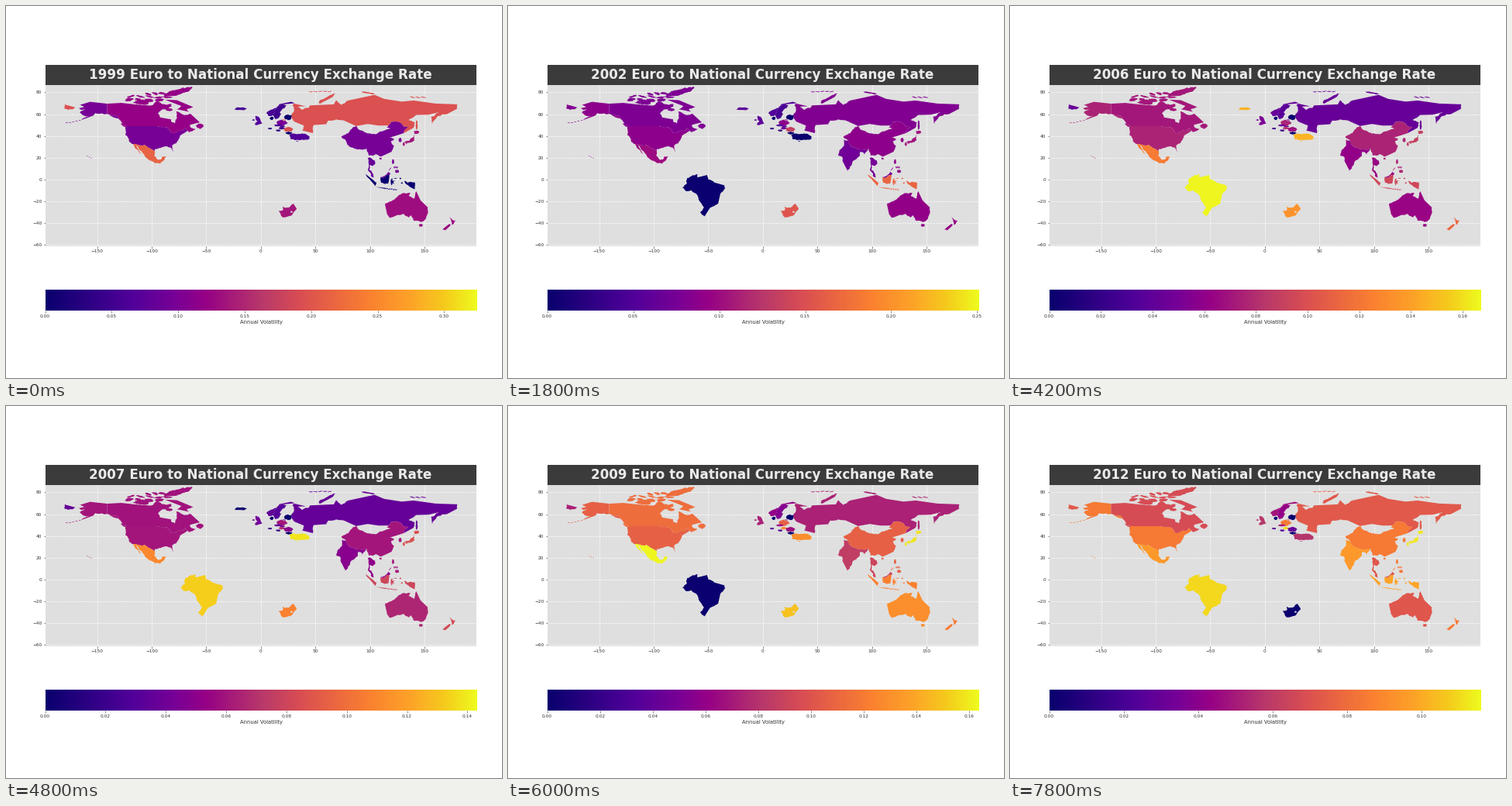
Animation, 640 px wide and 480 px high, one loop 8 s. Source, as a matplotlib script:

```python
import numpy as np
import matplotlib.pyplot as plt
from matplotlib.animation import FuncAnimation
from matplotlib.colors import LinearSegmentedColormap
from matplotlib.patches import Polygon

W, H, DPI = 640, 480, 100
FIRST_YEAR, HOLD, FRAMES = 1999, 3, 40
LAND_BG, INK = "#dfdfdf", "#333333"

rng = np.random.default_rng(4)
plt.rcParams["font.family"] = "DejaVu Sans"
cmap = LinearSegmentedColormap.from_list("heat", [
    (0, "#0a006e"), (.2, "#52009a"), (.3, "#780096"), (.37, "#960086"),
    (.5, "#b8386a"), (.6, "#db5050"), (.75, "#fa8030"), (.85, "#fda428"),
    (.93, "#f5cc1c"), (1, "#eefa1e")])

# Per year: top of the colour scale, and the dollar's share of it
TOPS = [.3242, .1643, .648, .2507, .2005, .1637, .1665,
        .1669, .143, .643, .1634, .1419, .15, .1157]
DOLLAR = [.3, .83, .2, .35, .52, .57, .54, .45, .42, .21, .65, .76, .68, .73]

# Volatility as a multiple of the dollar's: constant, or key points by year
TRENDS = {
    "Canada": {1999: 1.23, 2001: .9, 2005: .9, 2010: 1.1, 2012: .8},
    "Mexico": {1999: 2.2, 2001: 1.1, 2004: 1.2, 2008: 2.05, 2010: 1, 2012: 1.12},
    "Brazil": {2001: 1.8, 2002: 2.9, 2004: 1.3, 2006: 2.2, 2008: 2.24, 2010: 1.1, 2012: 1.3},
    "Russia": {1999: 2, 2001: .9, 2004: .96, 2006: .57, 2008: .63, 2012: .86},
    "Japan": {1999: 1.4, 2005: .95, 2008: 1.65, 2010: 1.33},
    "India": {2010: .8, 2012: 1.12},
    "Indonesia": {1999: 3.4, 2001: 2.3, 2004: 1.1, 2008: 1.4, 2010: .9, 2012: 1.16},
    "Australia": {1999: 1.33, 2004: .83, 2006: .85, 2008: 1.33, 2012: .85},
    "New Zealand": {1999: 1.3, 2004: .9, 2006: 1.5, 2010: 1},
    "South Africa": {1999: 1.4, 2001: 1.75, 2008: 1.8, 2010: 1, 2012: 1.37},
    "Turkey": {1999: .67, 2001: 5, 2004: 1.26, 2007: 2.3, 2010: .67},
    "Iceland": {1999: .6, 2004: .67, 2006: 1.95, 2008: 4.8},
    "Hungary": {1999: .5, 2006: 1.1, 2012: 1.3},
    "Romania": {1999: 2, 2006: .9, 2012: .35},
    "Thailand": .85, "Malaysia": .85, "UK": .68, "Norway": .57, "Sweden": .5,
    "Czechia": .6, "Slovakia": .6, "Switzerland": .3, "Croatia": .3,
    "Denmark": 0, "Bulgaria": 0, "Baltics": 0,
}
SINCE = {"Brazil": 2000, "India": 2000}
UNTIL = {"Iceland": 2008, "Slovakia": 2008}


def share(name, i):
    year = FIRST_YEAR + i
    trend = TRENDS.get(name, 1)
    if isinstance(trend, dict):
        trend = np.interp(year, list(trend), list(trend.values()))
    return min(1, trend * DOLLAR[i])


fig = plt.figure(figsize=(W / DPI, H / DPI), dpi=DPI, facecolor="white")


def panel(x0, y0, x1, y1, color):
    ax = fig.add_axes([x0 / W, 1 - y1 / H, (x1 - x0) / W, (y1 - y0) / H], facecolor=color)
    for spine in ax.spines.values():
        spine.set_visible(False)
    ax.tick_params(labelsize=4.2, length=1.8, width=.4, pad=1.5, color=INK, labelcolor=INK)
    return ax


head = panel(51, 76.4, 607, 102.2, "#3b3b3b")
head.set(xticks=[], yticks=[])
title = head.text(.499, .53, "", ha="center", va="center", transform=head.transAxes,
                  color="#ebebeb", size=12.04, weight="bold")

world = panel(51, 102.4, 607, 309.9, LAND_BG)
world.set(xlim=(-197.4, 197.6), ylim=(-61.1, 86.4),
          xticks=range(-150, 151, 50), yticks=range(-60, 81, 20))
world.grid(color="white", ls="--", lw=.5)
world.set_axisbelow(True)

bar = panel(50.6, 366, 607, 393, "white")
ramp = bar.imshow(np.linspace(0, 1, 256)[None], cmap=cmap, aspect="auto")
bar.set_yticks([])
fig.text(329 / W, 1 - 408 / H, "Annual Volatility", ha="center", va="center",
         size=4.85, color=INK)

shapes = {}


def path(*coords):
    return list(zip(coords[::2], coords[1::2]))


def roughen(pts):
    """Bend short edges; shared borders bend alike since only the midpoint matters."""
    out = []
    for p, q in zip(pts, np.roll(pts, -1, axis=0)):
        out.append(p)
        size = np.hypot(*(q - p))
        if .8 < size < 9:
            mid = (p + q) / 2
            out.append(mid + .1 * size * np.sin(mid[::-1] * 37 + mid * 11))
    return np.array(out)


def land(name, pts):
    pts = np.array(pts, float)
    for _ in range(3):
        pts = roughen(pts)
    patch = world.add_patch(Polygon(pts, closed=True, lw=0, zorder=3))
    shapes.setdefault(name, []).append(patch)


def blob(name, lon, lat, width, height, tilt=0):
    """An uneven ellipse for islands and small countries."""
    a = np.linspace(0, 2 * np.pi, 16, endpoint=False)
    r = rng.uniform(.8, 1.2, a.size) / 2
    x, y = width * r * np.cos(a), height * r * np.sin(a)
    c, s = np.cos(np.radians(tilt)), np.sin(np.radians(tilt))
    land(name, np.column_stack([lon + c * x - s * y, lat + s * x + c * y]))


def chain(name, start, end, count, width, height):
    for lon, lat in np.linspace(start, end, count):
        blob(name, lon, lat + rng.uniform(-.3, .3), width, height, rng.uniform(-20, 20))


# Borders that two countries share
YUKON = path(-130, 55.3, -130, 56.1, -134, 58.8, -137.5, 59, -141, 60.3, -141, 69.6)
NORTH = path(-123, 49, -95.2, 49, -88.4, 48.3, -84.8, 46.8, -82.4, 43, -79, 42.8,
             -74.8, 45, -71, 45.2, -69.2, 47.4, -67.1, 45)
RIO = path(-97.2, 25.9, -99.5, 27.5, -103, 29.2, -106.5, 31.8, -111, 31.3, -114.8, 32.5,
           -117.1, 32.5)
AMUR = path(131, 42.6, 131.5, 45, 135, 48.4, 130.8, 48.8, 125.7, 53, 120, 53, 117, 49.6)
HIMALAYA = path(78, 35.5, 81, 30.2, 88.8, 27.5, 97, 28.3)
BORNEO = path(109.6, 2, 112, 1.4, 115.6, 4.1, 117.8, 4.1)
KJOLEN = path(11.2, 59, 12.3, 61, 12.5, 64, 18.2, 68.5, 20.5, 69)

land("USA", YUKON + path(
    -156.6, 71.3, -166, 68.4, -162, 66.4, -168, 65.6, -161, 64, -166, 61.6, -162, 58.6,
    -157.5, 58.5, -164.8, 54.6, -154, 58.5, -151.5, 61, -146, 60.8, -139.5, 59.7, -135, 57))
chain("USA", (-178, 51.8), (-166, 54), 5, 2.2, .5)
chain("USA", (-159, 21.8), (-155.5, 19.7), 3, .9, .6)
land("USA", NORTH + path(
    -70.5, 42.5, -74, 40.6, -75.8, 36, -81.2, 31.5, -80.3, 25.3, -83, 29.5, -89.5, 30,
    -97.3, 27.8) + RIO + path(-120.6, 34.6, -124.2, 41, -124.3, 48.3))

land("Canada", YUKON + path(
    -128, 70.3, -115, 68.9, -101, 67.8, -95.5, 71.8, -90, 69, -82, 69.3, -82, 67, -87, 64.7,
    -94.5, 60.5, -92.5, 57, -82.3, 55.2, -82, 53, -79, 51.3, -77, 56.5, -77.5, 62.5,
    -69.5, 59, -64.5, 60.3, -56, 52.5, -65, 50.2, -64.5, 48, -60, 46.3, -66, 43.5)
    + NORTH[::-1] + path(-127, 51))
land("Canada", path(-88, 73.3, -77, 72.8, -62, 66.5, -68, 64, -66, 62.2, -77, 64.5, -73, 67.5))
blob("Canada", -56, 49, 6, 4.5)
blob("Canada", -125.8, 49.7, 5.5, 1.4, -35)
blob("Canada", -109, 70.8, 15, 4.4)
blob("Canada", -84, 64.2, 6, 2.6)
blob("Canada", -77, 80.2, 27, 5, 15)
chain("Canada", (-121, 73), (-93, 73), 4, 7.5, 2.8)
chain("Canada", (-119, 76.2), (-85, 75.4), 5, 8, 1.5)
chain("Canada", (-103, 78.3), (-91, 79.3), 3, 6, 2)

land("Mexico", RIO + path(
    -115, 28.5, -109.8, 23.2, -114.4, 31.3, -113, 30.8, -109, 25.6, -105.5, 20.2, -100, 17,
    -92.2, 14.6, -88.5, 18, -87, 21.5, -90.5, 21, -91.5, 18.6, -94.5, 18.2, -97.8, 22))

land("Brazil", path(
    -64, 4, -60, 5, -59.8, 2, -51, 4.2, -50, 0, -44.5, -2.7, -35.3, -5.3, -34.9, -8.5,
    -39, -13, -41, -22, -48.5, -26, -53.4, -33.7, -57.5, -30.2, -54, -25.5, -58, -20,
    -60.5, -13.7, -65.4, -10, -70.6, -10.5, -73.9, -7.3, -69.9, -4, -69.5, 1.2))

land("Russia", path(
    30.9, 69.6, 41, 67.3, 34, 66.6, 38, 64, 44, 66, 45, 68, 67, 69, 69, 72.8, 74, 68.5,
    80, 72.5, 104.3, 77.7, 113, 74, 129, 71.5, 140, 72.5, 160, 69.7, 180, 69, 180, 65,
    170.5, 60, 162, 58, 157, 51.2, 156, 57.5, 163, 61.8, 154, 59.5, 142, 59.2, 135.2, 54.7,
    141, 52.5, 140, 47.5) + AMUR + path(
    108, 49.5, 98, 51, 87.3, 49.1, 76.5, 54, 69, 55.2, 61.5, 54, 60, 50.8, 48.5, 50,
    47.7, 42.6, 38, 45, 39.5, 49.5, 31, 53, 28, 56.5, 28, 60, 30.5, 64, 29, 68.5))
land("Russia", path(-180, 68.9, -169.8, 66.1, -173, 64.3, -180, 65))
blob("Russia", 142.8, 50, 1.8, 8.5)
blob("Russia", 60, 74.2, 18, 2.6, 28)
blob("Russia", 21.3, 54.7, 2.6, .9)
chain("Russia", (46, 80.5), (63, 80.7), 5, 4, .7)
chain("Russia", (95, 80), (102, 78.7), 3, 5, 1.3)
chain("Russia", (139, 75.4), (149, 75.2), 3, 5, .8)

land("China", path(
    73.6, 39.4, 80.2, 42.5, 82.5, 46, 87.3, 49.1, 91, 45.2, 97, 42.7, 105, 41.6, 112, 44.5,
    119.8, 46.7, 115.5, 47.7) + AMUR[::-1] + path(
    121.5, 39.5, 118, 38.5, 122.5, 37, 119.2, 35, 122, 30.8, 119.8, 25.5, 110, 21,
    105.5, 23.2, 99, 22) + HIMALAYA[::-1])
blob("China", 109.8, 19.2, 2.2, 1.6)

land("India", path(74, 36.8) + HIMALAYA + path(
    93, 23, 91.8, 25, 89, 25.5, 88.9, 22, 82.3, 16.6, 80, 12, 77.6, 8.1, 73, 17, 72.5, 21,
    69, 22.3, 70, 26.5, 74.5, 31.5))

land("Japan", path(141, 41.4, 140.9, 36, 135.8, 33.7, 131, 34.2, 136.5, 36, 139.8, 39))
blob("Japan", 142.7, 43.4, 5, 3)
blob("Japan", 131, 32.5, 2, 3.4)
blob("Japan", 133.5, 33.5, 2.6, 1)
blob("Korea", 127.8, 36.3, 2.8, 3.8)

land("Thailand", path(
    98, 19.5, 100.2, 20.3, 104.5, 17.5, 105, 14.3, 102.4, 12.5, 100, 13.4, 99.3, 9.3,
    102, 6.3, 100, 6.3, 98.3, 8.2, 99, 14))
land("Malaysia", path(100.3, 6.5, 102.2, 6.2, 103.6, 1.6, 101, 3))
land("Malaysia", BORNEO + path(119, 5.2, 116.8, 7, 113, 3.2))

land("Indonesia", BORNEO + path(117.5, 0, 116.2, -3.8, 110.2, -2.9))
land("Indonesia", path(95.3, 5.6, 103.7, -1, 106, -3, 105, -5.9, 99, 1))
land("Indonesia", path(105.2, -6.7, 114.4, -7.7, 114.4, -8.7))
land("Indonesia", path(119.8, .8, 125, 1.5, 120.4, .2, 120.3, -1, 123.3, -.9, 121.5, -2,
                       122.5, -5, 120.8, -2.7, 119.6, -5.5))
land("Indonesia", path(131, -.8, 134.5, -3, 141, -2.6, 141, -9.1, 138, -7.5, 133, -4))
chain("Indonesia", (115.5, -8.5), (124, -9.3), 5, 2, .8)
chain("Indonesia", (127.9, 1), (129.3, -3.2), 2, 1.6, 1.4)

blob("Philippines", 121.2, 16.4, 2, 4.6)
blob("Philippines", 124.8, 7.6, 3.6, 3)
blob("Philippines", 118.5, 9.8, 3.8, .6, 50)
chain("Philippines", (122.3, 11), (125, 11.3), 3, 1, 2)

land("Australia", path(
    113.7, -22.5, 115.8, -32, 118, -35, 126, -32.3, 131, -31.5, 135.5, -34.8, 137.8, -33,
    140, -37.5, 146.4, -39, 150, -37.4, 153.3, -30, 153, -25.5, 146.3, -19, 142.5, -10.8,
    140.8, -17.4, 135.6, -15, 136.9, -12.2, 130.5, -12.4, 123.6, -17, 119, -20))
blob("Australia", 146.6, -42, 3.6, 2.6)
land("New Zealand", path(172.8, -34.5, 178.4, -37.7, 175.3, -41.6, 174.6, -38.5))
land("New Zealand", path(172.8, -40.6, 174, -41.7, 168.8, -46.6, 166.5, -45.9))

land("South Africa", path(
    16.5, -28.6, 20, -28.4, 20, -24.8, 25.5, -25.7, 30, -22.2, 32.8, -27, 28, -33,
    20, -34.8, 18.2, -32))
blob("Lesotho", 28.2, -29.6, 2, 1.6)

land("Turkey", path(26, 40.5, 28, 41.9, 35, 42, 41.5, 41.5, 44.6, 39.5, 44.5, 37.2,
                    36.1, 36.2, 30.6, 36.5, 27.5, 36.8))
blob("Turkey", 33.3, 35.1, 2, .7)

land("Norway", KJOLEN + path(31, 70, 26, 71, 17, 69.2, 10.5, 64.3, 5, 61, 7.3, 58))
land("Sweden", KJOLEN + path(23.5, 68, 22, 65.8, 17.2, 61.7, 18.8, 60, 16.4, 56.5, 13, 55.4))
land("UK", path(-5.5, 50.1, 1.4, 51.2, 0, 53.5, -2, 57.5, -5, 58.5, -4.5, 54.6, -3, 53.5, -5, 52))
blob("UK", -6.8, 54.6, 2.4, 1.2)
blob("Iceland", -18.8, 65, 10, 2.7)
blob("Poland", 19.2, 52, 9.5, 5)
blob("Czechia", 15.5, 49.8, 6, 2)
blob("Slovakia", 19.6, 48.7, 5, 1.3)
blob("Hungary", 19.3, 47.1, 6, 2.4)
blob("Romania", 25, 45.9, 8.6, 4.2)
blob("Bulgaria", 25.5, 42.7, 6, 2.4)
blob("Baltics", 25, 57.2, 7, 4.6)
blob("Switzerland", 8.2, 46.8, 4, 1.6)
blob("Denmark", 9.8, 56.1, 3.6, 2.8)
blob("Croatia", 16, 45, 4, 1.8)

# Enclave without data, cut out of the country around it
for hole in shapes.pop("Lesotho"):
    hole.set(facecolor=LAND_BG, zorder=4)


def draw(frame):
    i = frame // HOLD
    year = FIRST_YEAR + i
    title.set_text(f"{year} Euro to National Currency Exchange Rate")
    ramp.set_extent((0, TOPS[i], 0, 1))
    bar.set_xlim(0, TOPS[i])
    for name, patches in shapes.items():
        shown = SINCE.get(name, year) <= year <= UNTIL.get(name, year)
        for patch in patches:
            patch.set_visible(shown)
            patch.set_facecolor(cmap(share(name, i)))
    return []


anim = FuncAnimation(fig, draw, frames=FRAMES, interval=200, repeat=True, repeat_delay=0)
plt.show()
```
